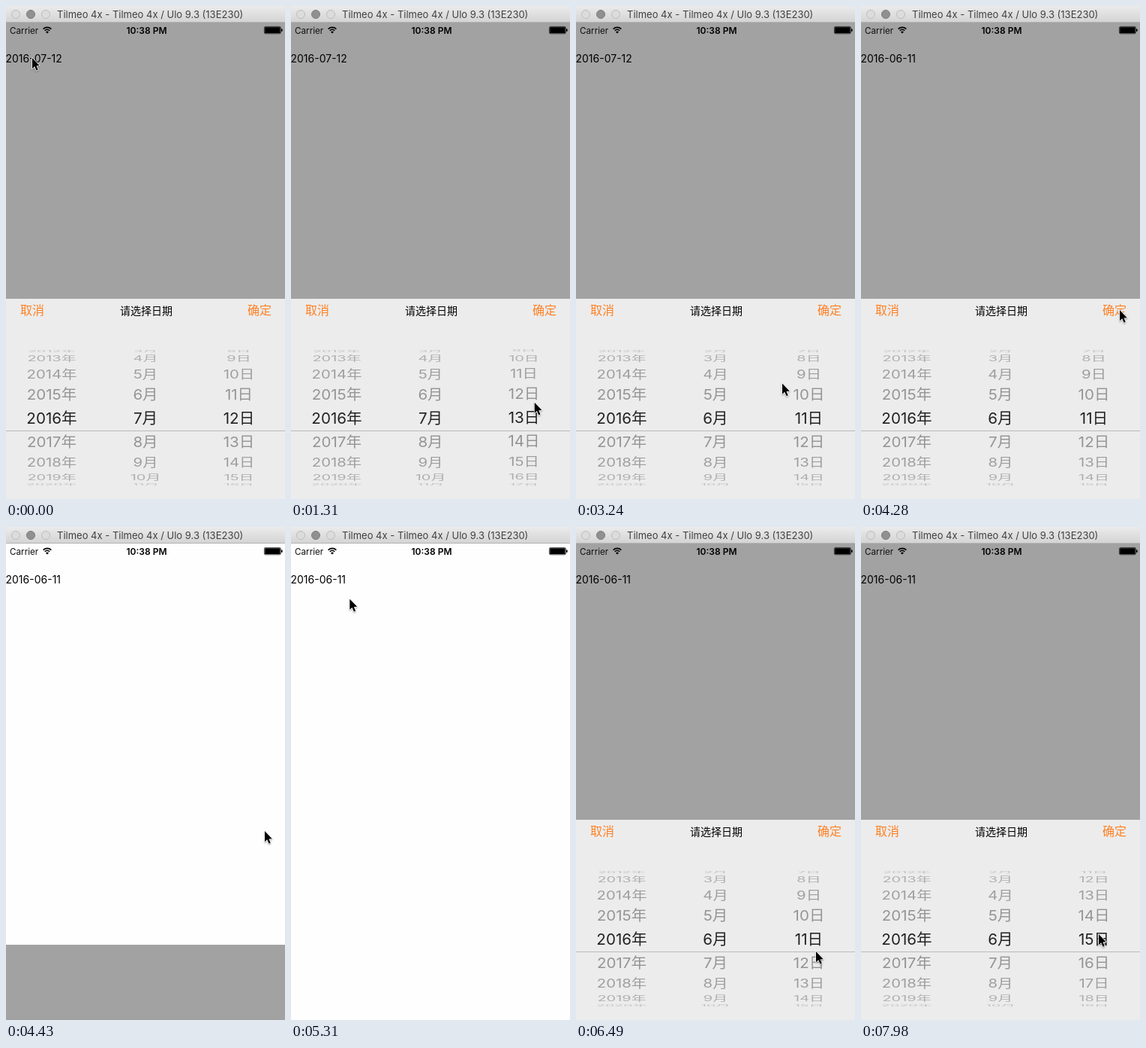
An HTML page with a canvas for the animation above (8000 ms loop, 372 by 655 pixels).

```html
<!DOCTYPE html>
<html lang="zh-CN">
<head>
<meta charset="utf-8">
<title>Date picker</title>
<style>
  html, body { margin: 0; width: 100%; height: 100%; overflow: hidden; background: #fff; }
  canvas { display: block; width: 372px; height: 655px; }
</style>
</head>
<body>
<canvas id="stage"></canvas>
<script>
const W = 372, H = 655, LOOP = 8000, TICK = 148;
const FONT = 'Inter, "Noto Sans CJK SC", "Noto Sans CJK JP", sans-serif';
const canvas = document.getElementById('stage');
const ctx = canvas.getContext('2d');
const dpr = window.devicePixelRatio || 1;
canvas.width = W * dpr;
canvas.height = H * dpr;

// Keys are [tick, value...]
const CURSOR = [
  [0, 35, 69], [8, 319, 560], [11, 341, 432], [14, 320, 591], [17, 206, 547],
  [18, 206, 547], [20, 208, 579], [24, 342, 424], [25, 361, 402], [27, 345, 404],
  [31, 345, 404], [37, 57, 71], [40, 57, 71], [44, 320, 564], [45, 320, 564],
  [49, 328, 414], [53, 314, 522], [54, 317, 541]
];
const DAY = [[8, 12], [11, 16], [14, 11], [45, 11], [49, 15]];
const MONTH = [[18, 7], [20, 6]];
const SLIDE = [[29, 0], [30, 533], [31, 640], [37, 640], [38, 595], [39, 133], [40, 0]];
const CONFIRM = 29;

function track(keys, k) {
  if (k <= keys[0][0]) return keys[0].slice(1);
  const i = keys.findIndex(key => key[0] >= k);
  if (i < 0) return keys[keys.length - 1].slice(1);
  const a = keys[i - 1], b = keys[i];
  const p = (k - a[0]) / (b[0] - a[0]);
  const e = p * p * (3 - 2 * p);
  return a.slice(1).map((v, j) => v + (b[j + 1] - v) * e);
}

// y is the vertical middle of the glyphs
function text(str, x, y, size, color, align = 'left', weight = 400) {
  ctx.font = `${weight} ${size}px ${FONT}`;
  ctx.textAlign = align;
  ctx.fillStyle = color;
  ctx.fillText(str, x, y + size * 0.37);
}

function rect(x, y, w, h, color) {
  ctx.fillStyle = color;
  ctx.fillRect(x, y, w, h);
}

function titleBar() {
  const g = ctx.createLinearGradient(0, 0, 0, 22);
  g.addColorStop(0, '#ebebeb');
  g.addColorStop(1, '#d3d3d3');
  rect(0, 0, W, 22, g);
  rect(0, 21, W, 1, '#b4b4b4');
  [['#dcdcdc', '#bdbdbd'], ['#909090', '#7c7c7c'], ['#dcdcdc', '#bdbdbd']].forEach(([fill, line], i) => {
    ctx.beginPath();
    ctx.arc(13 + 20 * i, 11, 5.5, 0, 7);
    ctx.fillStyle = fill;
    ctx.fill();
    ctx.lineWidth = 1;
    ctx.strokeStyle = line;
    ctx.stroke();
  });
  text('Tilmeo 4x - Tilmeo 4x / Ulo 9.3 (13E230)', 68, 11.3, 13, '#404040');
}

function statusBar() {
  text('Carrier', 5, 32.3, 11.7, '#111');
  text('10:38 PM', 187.5, 32.3, 12, '#000', 'center', 600);
  ctx.strokeStyle = ctx.fillStyle = '#000';
  ctx.lineWidth = 1.6;
  for (const r of [4.6, 7.6]) {
    ctx.beginPath();
    ctx.arc(55, 36, r, -Math.PI * 0.75, -Math.PI * 0.25);
    ctx.stroke();
  }
  ctx.beginPath();
  ctx.moveTo(55, 36.5);
  ctx.arc(55, 36.5, 2.8, -Math.PI * 0.75, -Math.PI * 0.25);
  ctx.fill();
  ctx.lineWidth = 0.7;
  ctx.beginPath();
  ctx.roundRect(344.4, 27.4, 22, 9.4, 1.8);
  ctx.stroke();
  ctx.fillRect(345.2, 28.2, 20.4, 7.8);
  ctx.fillRect(367, 30.5, 1.6, 3.2);
}

function wheel(x, value, unit, selected) {
  const R = 90, STEP = 20.3 * Math.PI / 180;
  for (let n = Math.ceil(value - 4.4); n <= value + 4.4; n++) {
    const a = (n - value) * STEP, c = Math.cos(a);
    if (c <= 0.02) continue;
    ctx.save();
    ctx.translate(x, 547.3 + R * Math.sin(a));
    ctx.scale(0.94 + 0.06 * c, c);
    text(n + unit, 0, 0, 20.6, selected ? '#222' : `rgba(0,0,0,${0.14 + 0.25 * c})`, 'center');
    ctx.restore();
  }
}

function wheels(month, day, bands, selected) {
  ctx.save();
  ctx.beginPath();
  for (const [y, h] of bands) ctx.rect(0, y, W, h);
  ctx.clip();
  wheel(61, 2016, '年', selected);
  wheel(186, month, '月', selected);
  wheel(310.5, day, '日', selected);
  ctx.restore();
}

function panel(month, day) {
  rect(0, 389, W, 300, '#ececec');
  text('取消', 35, 404.5, 16, '#ff8024', 'center');
  text('请选择日期', 187, 404.5, 14, '#000', 'center');
  text('确定', 338, 404.5, 16, '#ff8024', 'center');
  wheels(month, day, [[440, 91], [564, 91]], false);
  wheels(month, day, [[531, 33]], true);
  rect(0, 564, W, 1, '#bababa');
}

function pointer(x, y) {
  ctx.save();
  ctx.translate(x, y);
  ctx.beginPath();
  [[0, 0], [0, 14.2], [3.2, 11.3], [5.6, 16.8], [7.8, 15.8], [5.5, 10.5], [9.8, 10.2]]
    .forEach(p => ctx.lineTo(...p));
  ctx.closePath();
  ctx.shadowColor = 'rgba(0,0,0,.35)';
  ctx.shadowBlur = 2 * dpr;
  ctx.shadowOffsetY = dpr;
  ctx.lineWidth = 1.6;
  ctx.lineJoin = 'round';
  ctx.strokeStyle = '#fff';
  ctx.stroke();
  ctx.shadowColor = 'transparent';
  ctx.fillStyle = '#000';
  ctx.fill();
  ctx.restore();
}

function draw(time) {
  // The screen refreshes in steps of one tick
  const k = Math.floor((time % LOOP + 24) / TICK);
  const [slide] = track(SLIDE, k);
  ctx.setTransform(dpr, 0, 0, dpr, 0, 0);
  rect(0, 0, W, H, '#fefefe');
  ctx.save();
  ctx.translate(0, slide);
  rect(0, 22, W, 662, '#a2a2a2');
  panel(track(MONTH, k)[0], track(DAY, k)[0]);
  ctx.restore();
  text(k < CONFIRM ? '2016-07-12' : '2016-06-11', -0.5, 70.2, 14, '#000');
  statusBar();
  titleBar();
  pointer(...track(CURSOR, k));
}

const start = performance.now();
function loop() {
  draw(performance.now() - start);
  requestAnimationFrame(loop);
}
loop();
</script>
</body>
</html>
```
